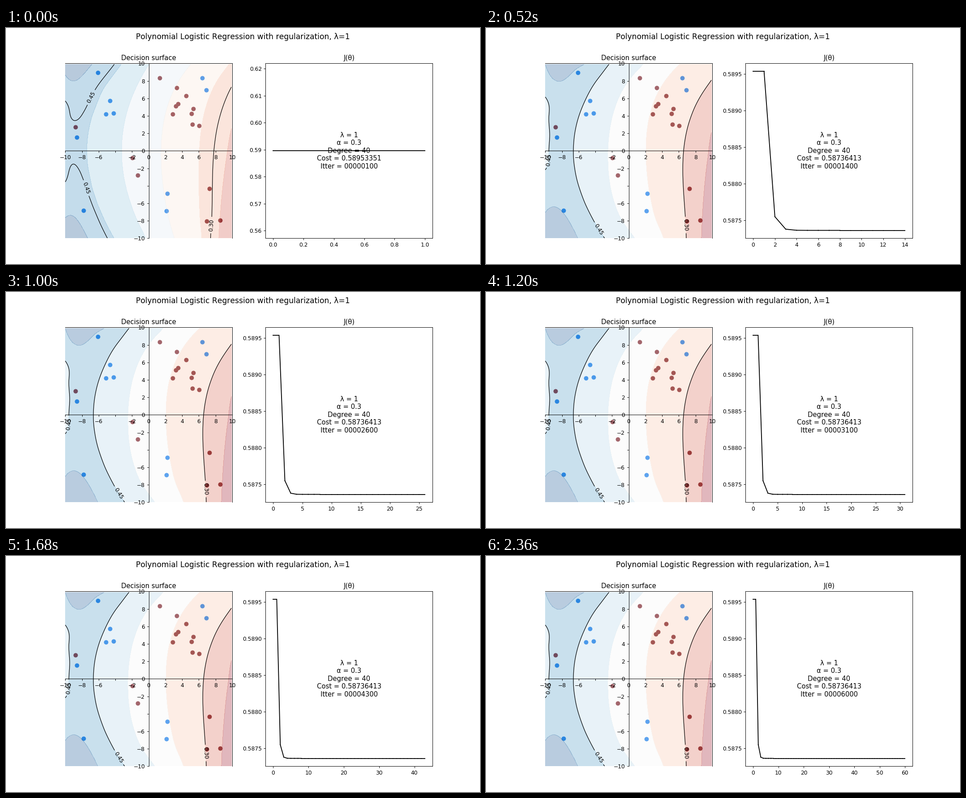
A matplotlib script for the animation above (2.4 s loop, 1058x529 px).

```python
import numpy as np
import matplotlib.pyplot as plt
from matplotlib.animation import FuncAnimation

FRAMES, INTERVAL = 60, 40
SETTLED = 9  # the surface no longer moves from this frame on
DPI = 1058 / 12
plt.rcParams["text.kerning_factor"] = 6

BLUE, RED = "#1c7fec", "#802830"
BLUE_DOTS = [(-6.08, 8.95), (-4.65, 5.73), (-5.12, 4.20), (-4.22, 4.30), (-8.64, 1.54),
             (-7.81, -6.82), (6.41, 8.33), (6.89, 6.98), (2.22, -4.88), (2.11, -6.87)]
RED_DOTS = [(1.30, 8.31), (3.37, 7.21), (4.47, 6.29), (3.51, 5.40), (3.24, 5.11), (2.86, 4.20),
            (5.33, 4.83), (5.12, 4.25), (5.22, 3.05), (6.03, 2.87), (-8.78, 2.71),
            (-1.97, -0.81), (-1.32, -2.81), (7.26, -4.31), (6.94, -8.02), (8.58, -7.92)]

GRID = np.arange(-10, 10, 0.1)
GX, GY = np.meshgrid(GRID, GRID)


def upright(level, *coefficients):
    """Contour x(y), a polynomial in y / 10."""
    t = np.linspace(-1, 1, 11)
    x = np.polynomial.polynomial.polyval(t, coefficients)
    keep = np.abs(x) <= 10
    return np.column_stack([x, 10 * t, np.full(t.size, level)])[keep]


def bowl(level, x0, y0, square, cube, x_end):
    """Contour y(x) around a vertex at (x0, y0), from the left edge to x_end."""
    x = np.linspace(-10, x_end, 7)
    d = x - x0
    return np.column_stack([x, y0 + square * d**2 + cube * d**3, np.full(x.size, level)])


def fit_surface(*contours, smoothing=0.1):
    """Cubic radial-basis surface through the contours, on the grid."""
    samples = np.vstack(contours)
    points, values = samples[:, :2], samples[:, 2]
    n = len(points)

    def kernel(x, y):
        return np.hypot(x[:, None] - points[:, 0], y[:, None] - points[:, 1]) ** 3

    system = np.zeros((n + 3, n + 3))
    system[:n, :n] = kernel(*points.T) + smoothing * np.eye(n)
    system[:n, n] = system[n, :n] = 1
    system[:n, n + 1:] = points
    system[n + 1:, :n] = points.T
    weights = np.linalg.solve(system, np.append(values, np.zeros(3)))
    x, y = GX.ravel(), GY.ravel()
    flat = kernel(x, y) @ weights[:n] + weights[n] + weights[n + 1] * x + weights[n + 2] * y
    return flat.reshape(GX.shape)


FIRST = fit_surface(
    bowl(0.48, -9.05, 7.98, 0.66, -0.125, -6.74),
    bowl(0.48, -9.42, -7.35, -0.85, 0.12, -7.33),
    bowl(0.45, -8.78, 3.48, 1.21, -0.245, -6.36),
    bowl(0.45, -8.99, -1.53, -1.67, 0.328, -6.36),
    upright(0.44, -7.41, 0, 3.72, 0.46),
    upright(0.40, -3.25, 0, 3.13, 0.23),
    upright(0.36, 1.47, 0.14, 2.10, 0.88, 0.53),
    upright(0.32, 6.06, 0.54, 1.35, 1.14, 0.62),
    upright(0.30, 7.80, 0.95, 1.75, 1.20),
    upright(0.28, 9.43, 1.60, 0.56))
FINAL = fit_surface(
    bowl(0.50, -8.40, 7.93, 0.57, -0.118, -5.34),
    bowl(0.50, -9.00, -6.38, -0.60, 0.06, -6.04),
    upright(0.45, -9.57, 1.00, -2.50),
    upright(0.45, -6.63, 0, 4.05, 0.30),
    upright(0.40, -2.50, 0.30, 2.35, 0.25, 1.42),
    upright(0.35, 2.06, 0, 2.12, 1.00, 1.00),
    upright(0.30, 6.57, 0.965, 2.735, 1.45),
    upright(0.25, 9.57, 1.43, 0.57))
FIRST_LABELS = [(-6.95, 6.14), (-7.44, -4.24), (7.4, -8.48)]
FINAL_LABELS = [(-3.41, -8.89), (-9.74, -1.02), (6.78, -8.48)]

# Gradient descent converges geometrically after the first step.
steps = np.arange(FRAMES + 1)
COSTS = 0.58736413 + 0.00216938 * 0.086 ** np.maximum(steps - 1, 0)

fig, (surface_ax, cost_ax) = plt.subplots(1, 2, figsize=(12, 6), dpi=DPI)
fig.subplots_adjust(left=0.125, right=0.9, bottom=0.1088, top=0.85, wspace=0.2)
fig.suptitle("Polynomial Logistic Regression with regularization, λ=1", fontsize=14)

surface_ax.set_title("Decision surface", y=1.0)
for dots, color in ((BLUE_DOTS, BLUE), (RED_DOTS, RED)):
    surface_ax.scatter(*zip(*dots), s=50, color=color)
ticks = range(-10, 11, 2)
tick_labels = ["" if t == -4 else str(t).replace("-", "−") for t in ticks]
for side in ("left", "bottom"):
    surface_ax.spines[side].set_position("zero")
surface_ax.set_xticks(ticks, tick_labels)
surface_ax.set_yticks(ticks, tick_labels)

shown = {"stage": None, "artists": []}


def draw_surface(frame):
    stage = min(frame, SETTLED)
    if stage == shown["stage"]:
        return
    for artist in shown["artists"]:
        artist.remove()
    values = FINAL + (FIRST - FINAL) * (0.29 ** stage if stage < SETTLED else 0)
    low, high, count = (0.20, 0.52, 8) if stage == 0 else (0.20, 0.55, 7)
    cmap = plt.get_cmap("RdBu")
    filled = surface_ax.contourf(
        GX, GY, np.clip(values, low + 1e-6, high - 1e-6),
        levels=np.linspace(low, high, count + 1),
        colors=[cmap((i + 0.5) / count) for i in range(count)], alpha=0.3)
    lines = surface_ax.contour(GX, GY, values, levels=[0.30, 0.45],
                               colors="k", linewidths=1.0)
    surface_ax.set(xlim=(-10, 10), ylim=(-10, 10))
    lines.clabel(fontsize=10, fmt="%.2f", inline=True,
                 manual=FIRST_LABELS if stage == 0 else FINAL_LABELS)
    shown.update(stage=stage, artists=[filled, lines])


def draw_cost(frame):
    cost_ax.clear()
    cost_ax.set_title("J(θ)", y=1.0)
    last = frame + 1
    # One line per step, so that flat steps snap to whole pixels.
    cost_ax.plot([steps[:last], steps[1:last + 1]],
                 [COSTS[:last], COSTS[1:last + 1]], color="k", linewidth=1.5)
    cost_ax.ticklabel_format(useOffset=False)
    cost_ax.text(0.5, 0.5,
                 f"λ = 1\nα = 0.3\nDegree = 40\nCost = {COSTS[last]:.8f}\n"
                 f"Itter = {last * 100:08d}",
                 transform=cost_ax.transAxes, ha="center", va="center", fontsize=12)


def update(frame):
    draw_surface(frame)
    draw_cost(frame)
    return []


animation = FuncAnimation(fig, update, frames=FRAMES, interval=INTERVAL,
                          repeat=True, repeat_delay=0, blit=False)
plt.show()
```
